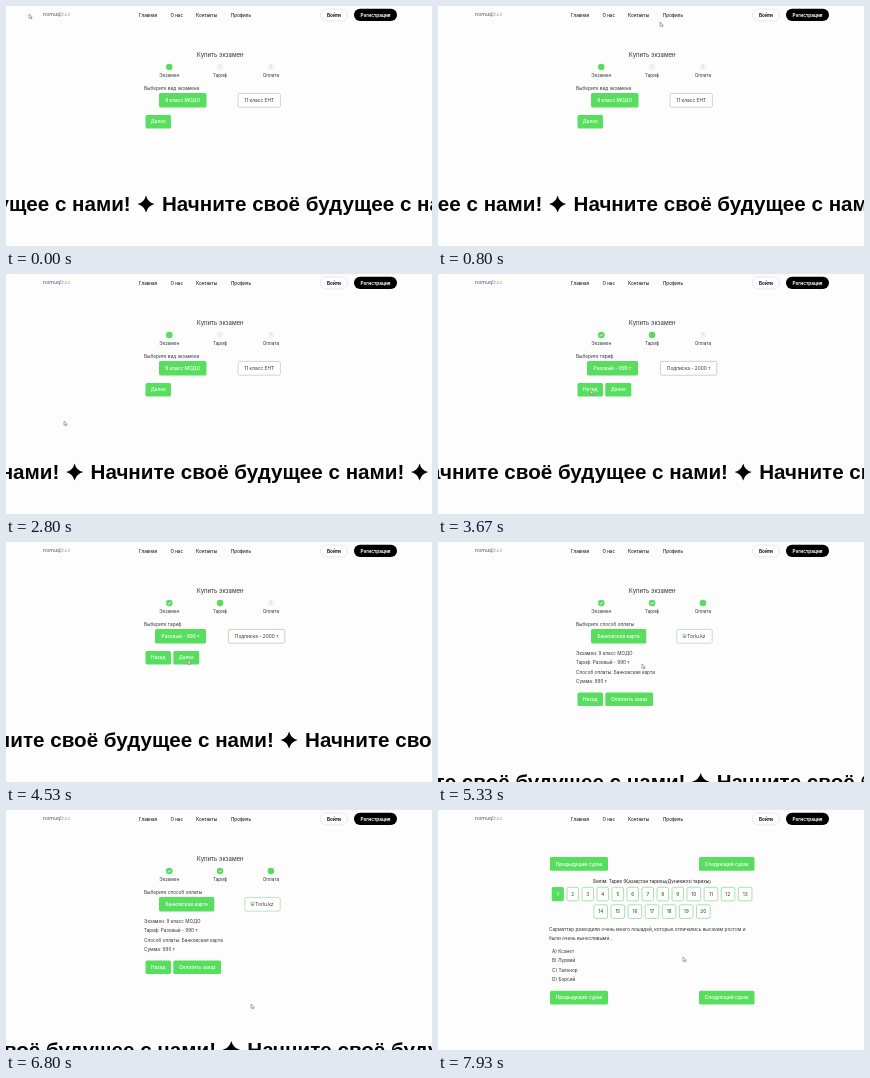
An HTML page with a canvas for the animation above (8 s loop, 426 px wide and 240 px high).

```html
<!DOCTYPE html>
<html lang="ru">
<head>
<meta charset="utf-8">
<title>Купить экзамен</title>
<style>
  html, body { margin: 0; width: 100%; height: 100%; overflow: hidden; background: #fdfdfd; }
  canvas { display: block; width: 426px; height: 240px; }
</style>
</head>
<body>
<canvas id="stage" width="426" height="240"></canvas>
<script>
const ctx = document.getElementById('stage').getContext('2d');
const LOOP = 8, FPS = 15;
const GREEN = '#58de5e', INK = '#333338', SANS = 'Inter, "Open Sans", sans-serif';
const TARIFF_AT = 3.47, PAYMENT_AT = 4.67, QUESTIONS_AT = 7.4;

// Pointer stops: time, x, y
const POINTER = [
  [0, 23, 8], [1.6, 421, 24], [2.8, 58, 147], [3.3, 150, 115], [3.6, 152, 116],
  [4.53, 182, 118], [4.8, 182, 118], [5.33, 204, 122], [5.9, 190, 157],
  [6.8, 245, 194], [7.93, 245, 147]
];

function text(str, x, y, { size = 4.7, weight = 400, color = INK, align = 'left', family = SANS } = {}) {
  ctx.font = `${weight} ${size}px ${family}`;
  ctx.fillStyle = color;
  ctx.textAlign = align;
  ctx.textBaseline = 'alphabetic';
  ctx.fillText(str, x, y + size * 0.36);
}

function box(x, y, w, h, radius, fill, stroke) {
  ctx.beginPath();
  ctx.roundRect(x, y, w, h, radius);
  if (fill) { ctx.fillStyle = fill; ctx.fill(); }
  if (stroke) { ctx.strokeStyle = stroke; ctx.lineWidth = 0.7; ctx.stroke(); }
}

function button(label, x, y, w, h = 13.5) {
  box(x, y, w, h, 1.6, GREEN);
  text(label, x + w / 2, y + h / 2, { size: 4.8, weight: 500, color: '#fff', align: 'center' });
}

function outlined(label, x, y, w, h, stroke) {
  box(x, y, w, h, 1.6, '#fff', stroke);
  text(label, x + w / 2, y + h / 2, { size: 4.8, align: 'center' });
}

function header() {
  text('nomuq', 37, 8.5, { size: 5.3, color: '#55555c' });
  text('Quiz', 53.5, 8.5, { size: 5, color: '#a5a5b4' });
  [['Главная', 133], ['О нас', 164.5], ['Контакты', 190], ['Профиль', 225]]
    .forEach(([label, x]) => text(label, x, 9, { size: 4.5, weight: 500, color: '#222' }));
  box(314.4, 3, 27.2, 12, 6, '#fff', '#dcdcee');
  text('Войти', 328, 9, { size: 4.6, weight: 700, color: '#111', align: 'center' });
  box(348, 2.7, 43, 12.3, 6.1, '#000');
  text('Регистрация', 369.5, 9, { size: 4.6, weight: 700, color: '#fff', align: 'center' });
}

function progress(active) {
  text('Купить экзамен', 214.2, 49, { size: 6, align: 'center' });
  ['Экзамен', 'Тариф', 'Оплата'].forEach((label, i) => {
    const x = 163.3 + i * 50.8, y = 61;
    ctx.beginPath();
    ctx.arc(x, y, i > active ? 2.6 : 3.3, 0, Math.PI * 2);
    if (i > active) {
      ctx.strokeStyle = '#dedeea';
      ctx.lineWidth = 0.6;
      ctx.stroke();
      text(i + 1, x, y, { size: 3.4, color: '#b4b4c4', align: 'center' });
    } else {
      ctx.fillStyle = GREEN;
      ctx.fill();
    }
    if (i < active) {
      ctx.beginPath();
      ctx.moveTo(x - 1.5, y);
      ctx.lineTo(x - 0.4, y + 1.1);
      ctx.lineTo(x + 1.6, y - 1.1);
      ctx.strokeStyle = '#fff';
      ctx.lineWidth = 0.8;
      ctx.stroke();
    }
    text(label, x, 69.2, { align: 'center' });
  });
}

function examStep() {
  progress(0);
  text('Выберите вид экзамена', 138, 82.5);
  button('9 класс МОДО', 153, 87, 47.5, 14.5);
  outlined('11 класс ЕНТ', 232, 87.4, 42.4, 13.8, '#bcc4c2');
  button('Далее', 139.5, 109, 25.5);
}

function tariffStep() {
  progress(1);
  text('Выберите тариф', 138, 82.5);
  button('Разовый - 990 т', 149, 87, 51, 14.5);
  outlined('Подписка - 2000 т', 222.4, 87.4, 56.4, 13.8, '#a5c9ab');
  button('Назад', 139.5, 109, 25.5);
  button('Далее', 167.3, 109, 26);
}

function paymentStep() {
  progress(2);
  text('Выберите способ оплаты', 138, 82.5);
  button('Банковская карта', 153, 87, 55.3, 14.5);
  outlined('', 238.8, 87.4, 35.4, 13.8, '#a9d9a4');
  box(245, 92.3, 3, 3.2, 0, '#dce9f4', '#a9b5bd');
  ctx.fillStyle = '#70b76b';
  ctx.fillRect(245.4, 94, 2.2, 1.3);
  text('Torlu.kz', 249.3, 94.3, { size: 4.8 });
  ['Экзамен: 9 класс МОДО', 'Тариф: Разовый - 990 т', 'Способ оплаты: Банковская карта', 'Сумма: 990 т']
    .forEach((line, i) => text(line, 138, 111.2 + i * 9.5));
  button('Назад', 139.5, 150.5, 25.5);
  button('Оплатить заказ', 167.3, 150.5, 47.8);
}

function numberRow(first, last, y) {
  const gap = 2.9, width = n => n < 10 ? 12.1 : 14.2;
  let total = -gap;
  for (let n = first; n <= last; n++) total += width(n) + gap;
  let x = 214 - total / 2;
  for (let n = first; n <= last; n++) {
    if (n === 1) button('1', x, y, width(n), 14.2);
    else outlined(n, x + 0.3, y + 0.3, width(n) - 0.6, 13.6, '#83d98a');
    x += width(n) + gap;
  }
}

function questionPage() {
  for (const y of [47, 180.8]) {
    button('Предыдущий сурак', 112, y, 58, 13.8);
    button('Следующий сурак', 261, y, 55.5, 13.8);
  }
  text('Бөлім: Тарих (Қазақстан тарихы/Дүниежүзі тарихы)', 214, 71,
    { size: 4.55, weight: 500, align: 'center' });
  numberRow(1, 13, 77);
  numberRow(14, 20, 94.5);
  text('Сарматтар разводили очень много лошадей, которые отличались высоким ростом и', 111, 119.7);
  text('были очень выносливыми...', 111, 128);
  ['A) Ксанет', 'B) Лурвий', 'C) Таленор', 'D) Борсий']
    .forEach((line, i) => text(line, 114, 141.3 + i * 9.5));
}

function star(x, y, r) {
  const k = r * 0.2;
  ctx.beginPath();
  ctx.moveTo(x, y - r);
  ctx.quadraticCurveTo(x + k, y - k, x + r, y);
  ctx.quadraticCurveTo(x + k, y + k, x, y + r);
  ctx.quadraticCurveTo(x - k, y + k, x - r, y);
  ctx.quadraticCurveTo(x - k, y - k, x, y - r);
  ctx.fillStyle = '#000';
  ctx.fill();
}

function marquee(t, y) {
  const period = 345;
  const start = (t < TARIFF_AT ? 140 : 398.7) - 25.5 * t;
  for (let x = start - 2 * period; x < 450; x += period) {
    star(x, y, 8.6);
    text('Начните своё будущее с нами!', x + 16, y,
      { size: 20.6, weight: 700, color: '#050505', family: '"Liberation Sans", Arial, sans-serif' });
  }
}

function pointer(t) {
  let i = 0;
  while (i < POINTER.length - 2 && t >= POINTER[i + 1][0]) i++;
  const [t0, x0, y0] = POINTER[i], [t1, x1, y1] = POINTER[i + 1];
  const p = Math.min(1, (t - t0) / (t1 - t0));
  const ease = p * p * (3 - 2 * p);
  ctx.save();
  ctx.translate(x0 + (x1 - x0) * ease, y0 + (y1 - y0) * ease);
  ctx.beginPath();
  [[0, 0], [0, 4.4], [1.1, 3.5], [1.9, 5], [2.6, 4.7], [1.9, 3.2], [3.3, 3.2]]
    .forEach(([x, y]) => ctx.lineTo(x, y));
  ctx.closePath();
  ctx.fillStyle = '#fff';
  ctx.fill();
  ctx.strokeStyle = '#777780';
  ctx.lineWidth = 0.6;
  ctx.stroke();
  ctx.restore();
}

function draw(t) {
  ctx.fillStyle = '#fdfdfd';
  ctx.fillRect(0, 0, 426, 240);
  header();
  if (t < TARIFF_AT) examStep();
  else if (t < PAYMENT_AT) tariffStep();
  else if (t < QUESTIONS_AT) paymentStep();
  else questionPage();
  if (t < QUESTIONS_AT) marquee(t, t < PAYMENT_AT ? 198 : 239.7);
  pointer(t);
}

const begin = performance.now();
function tick() {
  const t = ((performance.now() - begin) / 1000) % LOOP;
  draw(Math.floor(t * FPS + 0.1) / FPS);
  requestAnimationFrame(tick);
}
tick();
</script>
</body>
</html>
```
